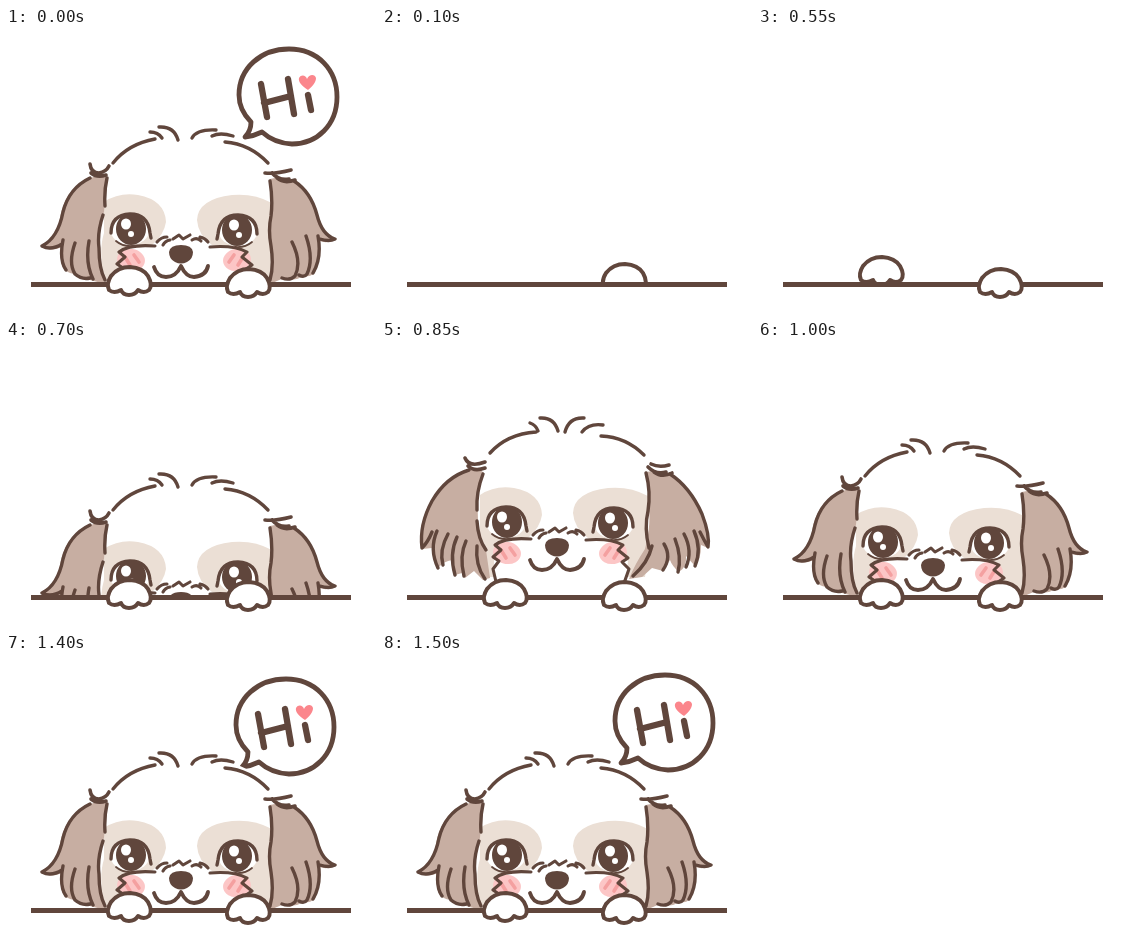
These frames come from a looping animation (370 px wide and 285 px high, 2 s). An HTML page with a canvas:

```html
<!DOCTYPE html>
<html lang="en">
<head>
<meta charset="utf-8">
<title>Puppy says hi</title>
<style>
html, body { margin: 0; width: 100%; height: 100%; overflow: hidden; background: #fff; }
canvas { display: block; width: 370px; height: 285px; }
</style>
</head>
<body>
<canvas id="stage" width="370" height="285"></canvas>
<script>
const ctx = document.getElementById('stage').getContext('2d');
const LOOP = 2000;
const INK = '#60463c', EAR = '#c7aea2', PATCH = '#ebdfd5', PINK = '#fcc6c6', ROSE = '#f4a0a0', HEART = '#fb868c';
const LINE_TOP = 254, LINE_HEIGHT = 5;

function fill(d, color) {
  ctx.fillStyle = color;
  ctx.fill(new Path2D(d));
}

function stroke(d, width = 3.4, color = INK) {
  ctx.strokeStyle = color;
  ctx.lineWidth = width;
  ctx.stroke(new Path2D(d));
}

function oval(x, y, rx, ry, color, turn = 0) {
  ctx.beginPath();
  ctx.ellipse(x, y, rx, ry, turn, 0, Math.PI * 2);
  ctx.fillStyle = color;
  ctx.fill();
}

function placed(x, y, draw, scaleX = 1, scaleY = 1) {
  ctx.save();
  ctx.translate(x, y);
  ctx.scale(scaleX, scaleY);
  draw();
  ctx.restore();
}

function clipped(bottom, draw) {
  ctx.save();
  ctx.beginPath();
  ctx.rect(0, 0, 370, bottom);
  ctx.clip();
  draw();
  ctx.restore();
}

// Ears and hair at rest
function restingFur() {
  fill('M85 150Q94 145 101 149Q99 170 98 184Q92 202 93 220Q94 240 99 256L84 252Q72 251 69 246Q60 245 56 238Q54 228 56 219Q45 224 35 219Q48 213 53 196Q57 160 85 150Z', EAR);
  fill('M264 151Q276 147 287 153Q305 165 311 187Q317 207 331 211Q322 216 313 213Q314 232 309 245Q302 250 296 248Q290 254 278 250L264 256Q268 232 264 207Q266 180 264 151Z', EAR);
  stroke('M84 150Q63 160 57 184Q52 210 36 218Q45 223 56 216M57 212Q53 232 60 242M69 215Q62 235 69 246Q76 252 84 250M83 213Q79 235 87 251M101 150Q98 163 99 178M97 187Q91 205 93 220Q93 241 99 252');
  stroke('M288 153Q305 164 311 187Q316 207 329 211Q323 214 314 211M312 208Q316 230 307 245M300 208Q308 231 301 246Q298 250 293 247M286 214Q296 234 289 248Q284 253 276 250M264 153Q267 172 265 188Q262 202 265 218Q268 238 264 252');
  stroke('M84 136Q85 145 93 145Q100 144 103 138M85 145Q91 150 100 147', 3.6);
  stroke('M259 145Q270 146 285 142M271 150Q278 156 289 152M266 145Q273 153 283 151', 3.6);
  stroke('M107 135Q122 116 149 111M144 104Q152 104 156 110M153 99Q168 98 172 112M186 110Q191 101 210 102M206 108Q214 104 227 108M219 114Q244 116 262 135');
}

// Ears and hair while the head jumps
function flyingFur() {
  fill('M87 129Q96 126 102 132Q94 153 96 181Q97 199 104 209L108 237L101 239L92 230L83 237L80 232L73 234Q70 225 70 219Q62 220 56 227Q50 220 50 207L40 208Q35 183 50 158Q64 135 87 129Z', EAR);
  fill('M264 131Q278 128 288 133Q310 147 322 175Q329 194 326 207L319 204Q319 219 313 225L304 215Q305 226 297 231Q290 225 288 219L281 230L270 227L260 236L247 238Q253 223 263 208Q270 180 266 163Q268 146 264 131Z', EAR);
  stroke('M87 129Q64 136 50 160Q37 184 40 207Q46 201 50 191M55 190Q47 208 56 227M66 193Q57 209 61 224M75 196Q67 213 73 234M84 200Q77 215 82 235M101 133Q94 151 95 169M95 180Q96 198 104 209M95 205Q93 224 103 238');
  stroke('M288 133Q308 146 320 173Q328 194 326 206Q322 199 318 191M312 190Q320 208 313 225M302 193Q311 210 304 226M293 198Q300 216 296 231M282 203Q290 216 281 229M264 132Q269 151 266 170Q262 187 267 207M270 205Q266 222 251 235');
  stroke('M83 117Q87 127 103 121M86 125Q92 131 103 127', 3.6);
  stroke('M269 123Q277 127 287 124M272 131Q280 137 290 132M266 126Q274 134 284 131', 3.6);
  stroke('M108 112Q125 93 154 91M148 82Q154 84 156 90M158 77Q172 76 176 90M183 91Q187 76 202 77M200 91Q207 82 221 84M219 95Q244 96 262 114');
}

function eye(x, y, flip) {
  placed(x, y, () => {
    oval(0, 0, 20, 16, '#fff');
    oval(1, 0, 15, 16, INK);
    stroke('M-19 4Q-19 -14 0 -15Q18 -15 20 4L21 9', 3.4);
    stroke('M-14 12Q-7 18 3 17', 1.8);
  }, flip, 1);
  oval(x - 4, y - 5, 5, 5.5, '#fff');
  oval(x + 1, y + 5, 3, 3, '#fff');
}

function cheek(x, y, flip) {
  placed(x, y, () => {
    oval(0, 0, 14, 11, PINK, 0.15);
    stroke('M-6 -3L-1 5M3 -5L8 2', 3.6, ROSE);
  }, flip, 1);
}

function face() {
  fill('M99 152Q122 109 175 108Q248 99 267 143L267 197Q267 226 253 275L103 275Q94 215 99 152Z', '#fff');
  fill('M98 174Q113 164 132 167Q159 172 160 194Q158 207 146 217L116 224L112 256L99 256Q92 224 98 205Z', PATCH);
  fill('M266 175Q248 165 226 167Q192 171 191 192Q192 207 206 217L240 225L246 256L263 256Q268 228 266 204Z', PATCH);
  fill('M153 220Q122 217 114 225L120 231L112 240L113 275L242 275L246 240L237 231L241 225Q226 218 203 220Z', '#fff');

  eye(124, 201, 1);
  eye(232, 202, -1);
  cheek(125, 232, 1);
  cheek(231, 232, -1);

  stroke('M149 218Q123 216 113 224L119 229L111 236L117 240L111 248L115 265', 3.1);
  stroke('M204 219Q228 217 241 224L236 229L246 237L240 241L247 248L241 265', 3.1);
  stroke('M151 214Q155 209 161 209M157 217Q159 213 164 212M167 211L173 207L177 211L184 207M186 212Q191 209 195 213M194 209Q199 210 202 214', 3.1);
  fill('M163 224Q164 217 175 217Q186 217 187 224Q187 231 181 234Q175 237 169 234Q163 231 163 224Z', INK);
  stroke('M148 239Q151 249 160 249Q170 249 175 238Q180 249 188 249Q200 248 202 238', 3.9);
}

function head(dy, flying) {
  clipped(LINE_TOP, () => {
    placed(0, dy, face);
    if (flying) flyingFur();
    else placed(0, dy, restingFur);
  });
}

function paw(x, y) {
  placed(x, y, () => {
    const d = 'M-20 9Q-23 3 -18 -5Q-11 -14 1 -14Q14 -13 19 -5Q24 4 20 9Q15 13 9 9Q6 14 0 14Q-6 14 -8 9Q-15 13 -20 9Z';
    fill(d, '#fff');
    stroke(d, 4);
  });
}

const leftPaw = (lift = 0) => paw(123, 253 - lift);
const rightPaw = (lift = 0) => paw(242, 255 - lift);

function table() {
  ctx.fillStyle = INK;
  ctx.fillRect(25, LINE_TOP, 320, LINE_HEIGHT);
}

function bubble(dx, dy, scaleX, scaleY) {
  placed(282 + dx, 68 + dy, () => {
    const d = 'M-37 26Q-49 14 -49 -1C-49 -28 -27 -47 1 -47C30 -47 49 -26 49 1C49 29 29 48 4 48Q-14 47 -26 36Q-34 40 -43 41Q-37 35 -37 26Z';
    fill(d, '#fff');
    stroke(d, 4.8);
    stroke('M-27 -12L-21 21M0 -17L6 18M-24 7L3 0M20 -1L23 14', 6.3);
    fill('M20 -6C14 -10 10 -14 11 -18C13 -22 18 -21 19 -17C21 -22 27 -22 28 -18C28 -14 25 -10 20 -6Z', HEART);
  }, scaleX, scaleY);
}

function dog(dy, flying) {
  head(dy, flying);
  table();
  leftPaw();
  rightPaw();
}

const greet = (dx, dy, sx = 1, sy = 1) => () => {
  bubble(dx, dy, sx, sy);
  dog(0);
};

// Raised paws stay behind the table edge
function reach(left, right) {
  clipped(LINE_TOP + LINE_HEIGHT, () => {
    if (left) leftPaw(left);
    if (right) rightPaw(right);
  });
  table();
}

// Each pose holds until the next one: [start, draw]
const poses = [
  [0, greet(0, 0)],
  [100, () => reach(0, 5)],
  [250, () => reach(0, 12)],
  [400, () => { reach(5, 0); rightPaw(); }],
  [550, () => { reach(10, 0); rightPaw(); }],
  [700, () => dog(34)],
  [850, () => dog(-20, true)],
  [1000, () => dog(0)],
  [1100, greet(-42, 78, 1.15, 1.18)],
  [1200, greet(-36, 51, 1.15, 1.18)],
  [1300, greet(-15, 22, 1.07, 1.08)],
  [1400, greet(-3, 4)],
  [1500, greet(0, 0)]
];

ctx.lineCap = ctx.lineJoin = 'round';

function render() {
  const t = performance.now() % LOOP;
  ctx.fillStyle = '#fff';
  ctx.fillRect(0, 0, 370, 285);
  poses.findLast(([start]) => start <= t)[1]();
  requestAnimationFrame(render);
}

render();
</script>
</body>
</html>
```
